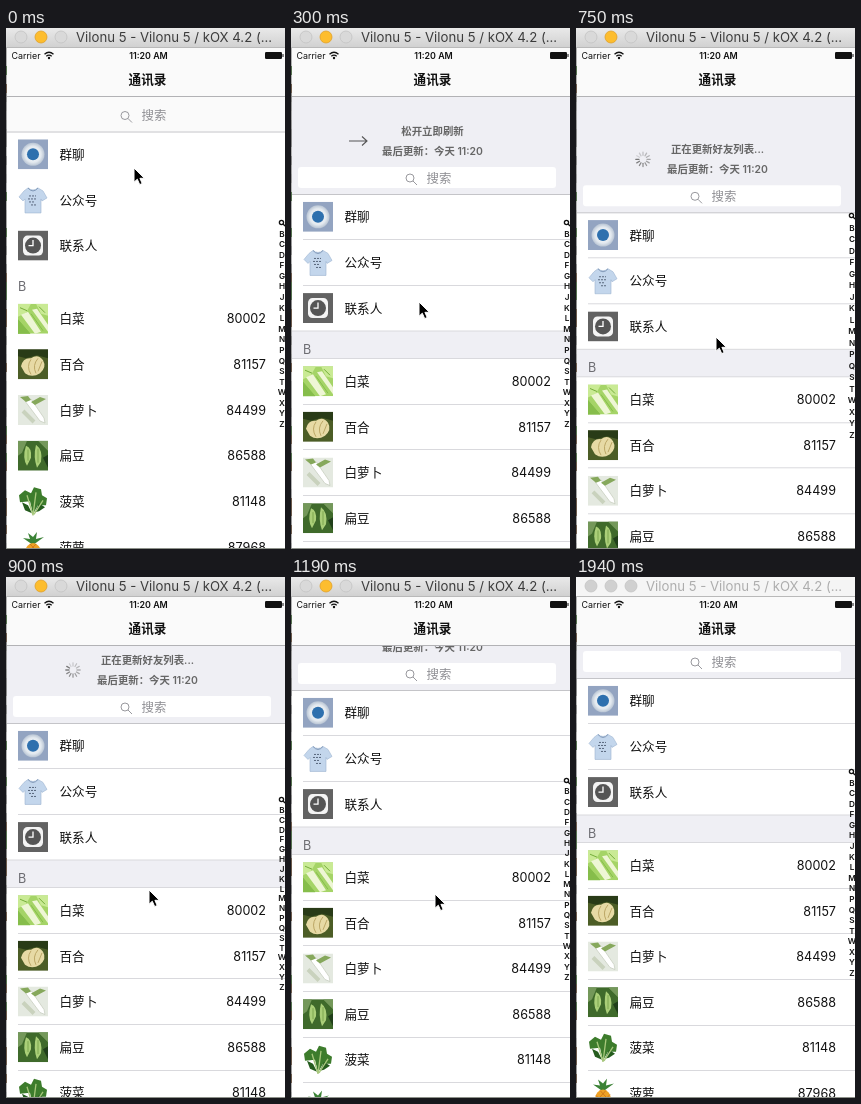
These frames come from a looping animation (279x521 px, 2.04 s). An HTML page:

```html
<!DOCTYPE html>
<html lang="zh-CN">
<head>
<meta charset="utf-8">
<title>通讯录</title>
<style>
html, body { margin: 0; width: 100%; height: 100%; overflow: hidden; background: #fff; }
svg { display: block; width: 100%; height: 100%; }
text { font-family: Inter, "Noto Sans CJK SC", "Noto Sans CJK", sans-serif; white-space: pre; }
</style>
</head>
<body>
<svg id="stage" viewBox="0 0 279 521">
  <defs>
    <linearGradient id="bar" x1="0" y1="0" x2="0" y2="1">
      <stop offset="0" stop-color="#e9e9e9"/><stop offset="1" stop-color="#d0d0d0"/>
    </linearGradient>
    <radialGradient id="disc">
      <stop offset="0" stop-color="#fff"/><stop offset=".7" stop-color="#e3e9ef"/><stop offset="1" stop-color="#b9c5d4"/>
    </radialGradient>
    <clipPath id="thumb"><rect width="30" height="30"/></clipPath>
    <g id="group">
      <rect width="30" height="30" fill="#93a4c1"/>
      <circle cx="15" cy="15" r="11.5" fill="url(#disc)"/>
      <circle cx="15" cy="15" r="6" fill="#2e70ae"/>
    </g>
    <g id="shirt">
      <path d="M10 3Q15 7 20 3L25 6L29 13L24 16L23 14V28H7V14L5 16L1 12L6 6Z" fill="#c3d6ec" stroke="#9db4d0" stroke-width=".6"/>
      <path d="M10 3Q15 9 20 3" fill="none" stroke="#8199b8"/>
      <path d="M11 11h7M10 14h9M11 17h6M13 20h5" stroke="#59677d" stroke-dasharray="2 1" fill="none"/>
    </g>
    <g id="clock">
      <rect width="30" height="30" fill="#626262"/>
      <rect x="5" y="5" width="20" height="20" rx="4.5" fill="#f4f4f4"/>
      <circle cx="15" cy="15" r="8" fill="#555"/>
      <path d="M15 9.500V15H10.500" stroke="#fff" stroke-width="1.300" fill="none"/>
    </g>
    <g id="cabbage">
      <rect width="30" height="30" fill="#a5d467"/>
      <path d="M0 0H13L8 9L0 13ZM18 0H30V12L23 10Z" fill="#c9ea94"/>
      <path d="M3 11L10 8L23 28L17 30ZM14 6L19 5L30 21V28Z" fill="#eef6d5"/>
      <path d="M0 16L12 30H0ZM13 10L25 27" fill="#86bd4b" stroke="#86bd4b"/>
      <path d="M2 4L9 7M21 3L27 9" stroke="#75ad3b"/>
    </g>
    <g id="lily">
      <rect width="30" height="30" fill="#4c5d26"/>
      <path d="M0 0H30V9L19 6L8 9L0 7Z" fill="#293b17"/>
      <path d="M3 17Q5 8 13 9Q20 4 25 11Q29 18 22 24Q14 29 7 24Z" fill="#e7daa5"/>
      <path d="M13 10Q8 17 13 25M20 9Q14 16 18 24M24 12L20 22" stroke="#bca766" fill="none"/>
    </g>
    <g id="radish">
      <rect width="30" height="30" fill="#e4e9e0"/>
      <path d="M7 6L13 4L26 23L27 28L22 26Z" fill="#fff" stroke="#c3cbbb" stroke-width=".7"/>
      <path d="M13 7L22 2L28 4L17 10ZM8 7L2 2L10 1L13 5Z" fill="#86a85c"/>
      <path d="M5 16L16 27" stroke="#c9d2bd" stroke-width="4"/>
    </g>
    <g id="bean">
      <rect width="30" height="30" fill="#3f6a2b"/>
      <path d="M0 0H9L4 12L0 15ZM20 0H30V10Z" fill="#74985a"/>
      <path d="M8 5Q14 7 13 17L9 25Q4 17 8 5ZM18 4Q25 9 23 21L19 27Q15 16 18 4Z" fill="#aacf78"/>
      <path d="M10 9V20M20 8V22" stroke="#7da64e"/>
      <path d="M25 17L30 14V27Z" fill="#203f1a"/>
    </g>
    <g id="spinach">
      <path d="M15 28L12 15L2 16L1 9L7 4L13 7L16 1L23 3L24 9L29 12L28 19L20 19Z" fill="#3d7c2c"/>
      <path d="M4 16L10 19L14 27L7 24ZM21 17L27 21L21 25L17 26Z" fill="#255c1e"/>
      <path d="M15 29L9 9M15 29L18 6M16 28L25 14" stroke="#a7c77c" stroke-width="1.300" fill="none"/>
    </g>
    <g id="pineapple">
      <path d="M15 13L5 6L12 7L10 1L15 5L19 0L18 7L26 5Z" fill="#3b8236"/>
      <ellipse cx="15" cy="21" rx="8" ry="10" fill="#efa125"/>
      <path d="M8 17L20 29M12 12L23 24M22 16L11 28M18 12L7 24" stroke="#c9711b" stroke-width=".8"/>
    </g>
    <g id="lens" fill="none"><circle cx="-1" cy="-1" r="4"/><path d="M2 2L6 6"/></g>
  </defs>

  <rect width="279" height="521" fill="#fff"/>
  <rect id="back" y="69" width="279" height="452" fill="#efeff4"/>
  <g id="list">
    <g id="refresh">
      <g id="arrow" fill="none" stroke="#555" stroke-width="1.100"><path d="M0 9V-9M-4.500 -4L0 -9L4.500 -4"/></g>
      <g id="spinner" stroke="#777" stroke-width="1.300" stroke-linecap="round"></g>
    </g>
    <rect id="field" x="7" y="74" width="258" height="21" rx="3" fill="#fff"/>
    <use href="#lens" x="120" y="86" stroke="#8e8e93" stroke-width=".9"/>
    <rect y="101" width="279" height="540" fill="#fff"/>
    <rect id="section" y="238" width="279" height="27.500" fill="#efeff4"/>
    <g id="lines" stroke="#d9d9dd"></g>
    <path d="M0 101.500H279" stroke="#c4c4c8"/>
    <g id="rows"></g>
  </g>
  <g id="index"></g>

  <rect y="20" width="279" height="49" fill="#fafafa"/>
  <path d="M0 68.500H279" stroke="#b2b2b5"/>
  <g id="status">
    <g fill="none" stroke="#111" stroke-width="1.300">
      <path d="M38.500 26.200Q43 22.200 47.500 26.200M40.300 28.200Q43 25.900 45.700 28.200"/>
    </g>
    <circle cx="43" cy="30" r="1.200" fill="#111"/>
    <rect x="259" y="24" width="17" height="7" rx="1.300" fill="#111"/>
    <path d="M277 26V29" stroke="#111"/>
  </g>
  <g id="window">
    <rect width="279" height="20" id="chrome"/>
    <path d="M0 19.500H279" stroke="#b9b9b9"/>
  </g>
  <g id="edge"></g>
  <path id="cursor" d="M0 0V14.200L3.300 11.200L5.700 16.600L8.200 15.500L5.900 10.300H10.400Z" fill="#000" stroke="#fff" stroke-width="1"/>
</svg>
<script>
const NS = 'http://www.w3.org/2000/svg';
const $ = id => document.getElementById(id);
const show = (node, on) => node.setAttribute('display', on ? 'inline' : 'none');
const move = (node, x, y, turn = 0) =>
  node.setAttribute('transform', `translate(${x} ${y}) rotate(${turn})`);

function add(parent, tag, attrs) {
  const node = document.createElementNS(NS, tag);
  for (const key in attrs) node.setAttribute(key, attrs[key]);
  parent.appendChild(node);
  return node;
}

// y is the middle of the line of text
function label(parent, str, x, y, size, attrs = {}) {
  const node = add(parent, 'text', { x, y: y + size * 0.37, 'font-size': size, fill: '#111', ...attrs });
  node.textContent = str;
  return node;
}

const MIDDLE = { 'text-anchor': 'middle' };
const LOOP = 2040, ROW = 45.65, INDEX = 'BCDFGHJKLMNPQSTWXYZ';
const PULL = '下拉可以刷新', RELEASE = '松开立即刷新', LOADING = '正在更新好友列表...';

// start, pull, message, arrow angle, pointer, ends of the letter index
const STEPS = [
  [0, 2.5, PULL, 180, [128, 140], 195, 396],
  [150, 40, PULL, 180, [128, 219], 195, 396],
  [300, 65, RELEASE, 90, [128, 274], 195, 396],
  [450, 85.5, RELEASE, 0, [130, 319], 195, 396],
  [600, 88, RELEASE, 0, [134, 322], 195, 396],
  [750, 83.3, LOADING, null, [140, 309], 188, 407],
  [900, 45, LOADING, null, [143, 313], 223, 410],
  [1040, 37, PULL, null, [144, 317], 221, 408],
  [1190, 12, PULL, null, [144, 317], 204, 400],
  [1340, 0, PULL, 180, null, 195, 396]
];

function addRow(y, icon, name, number) {
  const holder = add($('rows'), 'g', { transform: `translate(12 ${y - 15})`, 'clip-path': 'url(#thumb)' });
  add(holder, 'use', { href: '#' + icon });
  label($('rows'), name, 53.5, y, 12.6);
  if (number) label($('rows'), number, 260, y, 12.6, { 'text-anchor': 'end' });
}

[['group', '群聊'], ['shirt', '公众号'], ['clock', '联系人']]
  .forEach((row, i) => addRow(123.8 + i * ROW, ...row));
[['cabbage', '白菜', '80002'], ['lily', '百合', '81157'], ['radish', '白萝卜', '84499'],
 ['bean', '扁豆', '86588'], ['spinach', '菠菜', '81148'], ['pineapple', '菠萝', '87968']]
  .forEach((row, i) => addRow(288.2 + i * ROW, ...row));
label($('rows'), 'B', 12, 256, 12.6, { fill: '#6d6d72' });

const rule = (x, y) => add($('lines'), 'path', { d: `M${x} ${y}H279` });
[146.5, 192.5].forEach(y => rule(12, y));
[238, 265.5].forEach(y => rule(0, y));
for (let i = 1; i < 6; i++) rule(12, Math.round(265 + i * ROW) + 0.5);

label($('list'), '搜索', 135.5, 85, 12.4, { fill: '#8e8e93' });
const bold = { ...MIDDLE, 'font-weight': 600, fill: '#666' };
const message = label($('refresh'), PULL, 141.5, 38, 10.4, bold);
label($('refresh'), '最后更新：今天 11:20', 141.5, 58, 10.4, bold);

const spokes = Array.from({ length: 12 }, (_, i) =>
  add($('spinner'), 'path', { d: 'M0 -4V-7.200', transform: `rotate(${i * 30})` }));

const lens = add($('index'), 'use', { href: '#lens', stroke: '#111', 'stroke-width': 2.6 });
const letters = [...INDEX].map(c => label($('index'), c, 276, 0, 8.2, { ...MIDDLE, 'font-weight': 600 }));

label($('status'), 'Carrier', 5.5, 27.5, 8.9);
label($('status'), '11:20 AM', 142.5, 27.5, 8.9, { ...MIDDLE, 'font-weight': 600 });
label($('status'), '通讯录', 141.5, 51, 12.6, { ...MIDDLE, 'font-weight': 700 });

const buttons = [15, 35, 55].map(cx => add($('window'), 'circle', { cx, cy: 9, r: 6, 'stroke-width': 0.8 }));
const caption = label($('window'), 'Vilonu 5 - Vilonu 5 / kOX 4.2 (...', 70, 9.5, 13.2);

// sliver of desktop behind the window
const tones = ['#a3a3a3', '#8b8b8b', '#6b5a4c', '#9a9a9a', '#55704f', '#b0b0b0'];
for (let y = 20, seed = 7; y < 521; y += 9) {
  seed = (seed * 73 + 29) % 101;
  add($('edge'), 'rect', { y, width: 1, height: 9, fill: tones[seed % tones.length] });
}
add($('edge'), 'rect', { y: 520, width: 279, height: 1, fill: '#8d918a' });

function paintWindow(active) {
  $('chrome').setAttribute('fill', active ? 'url(#bar)' : '#f5f5f5');
  caption.setAttribute('fill', active ? '#3c3c3c' : '#adadad');
  buttons.forEach((dot, i) => {
    const lit = active && i === 1;
    dot.setAttribute('fill', lit ? '#fdbd2e' : active ? '#d9d9d9' : '#d0d0d0');
    dot.setAttribute('stroke', lit ? '#e0a02a' : active ? '#c3c3c3' : '#c4c4c4');
  });
}

function render(time) {
  const step = STEPS.filter(s => s[0] <= time).pop();
  const [start, pull, text, angle, pointer, top, bottom] = step;
  const plain = start === 0;

  move($('list'), 0, pull);
  $('back').setAttribute('fill', plain ? '#fafafa' : '#efeff4');
  $('section').setAttribute('fill', plain ? '#fff' : '#efeff4');
  show($('field'), !plain);
  show($('lines'), !plain);

  show($('refresh'), pull > 0);
  message.textContent = text;
  show($('arrow'), angle !== null);
  show($('spinner'), angle === null);
  move($('arrow'), 67, 48, angle || 0);
  move($('spinner'), 67, 48);
  const head = Math.floor(start / 83);
  spokes.forEach((spoke, i) =>
    spoke.setAttribute('opacity', 1 - 0.75 * ((head - i + 120) % 12) / 11));

  const gap = (bottom - top) / INDEX.length;
  lens.setAttribute('transform', `translate(276 ${top}) scale(.52)`);
  letters.forEach((node, i) => node.setAttribute('y', top + gap * (i + 1) + 3));

  show($('cursor'), pointer);
  if (pointer) move($('cursor'), ...pointer);
  paintWindow(time < 1940);
}

function tick() {
  render(performance.now() % LOOP);
  requestAnimationFrame(tick);
}
tick();
</script>
</body>
</html>
```
